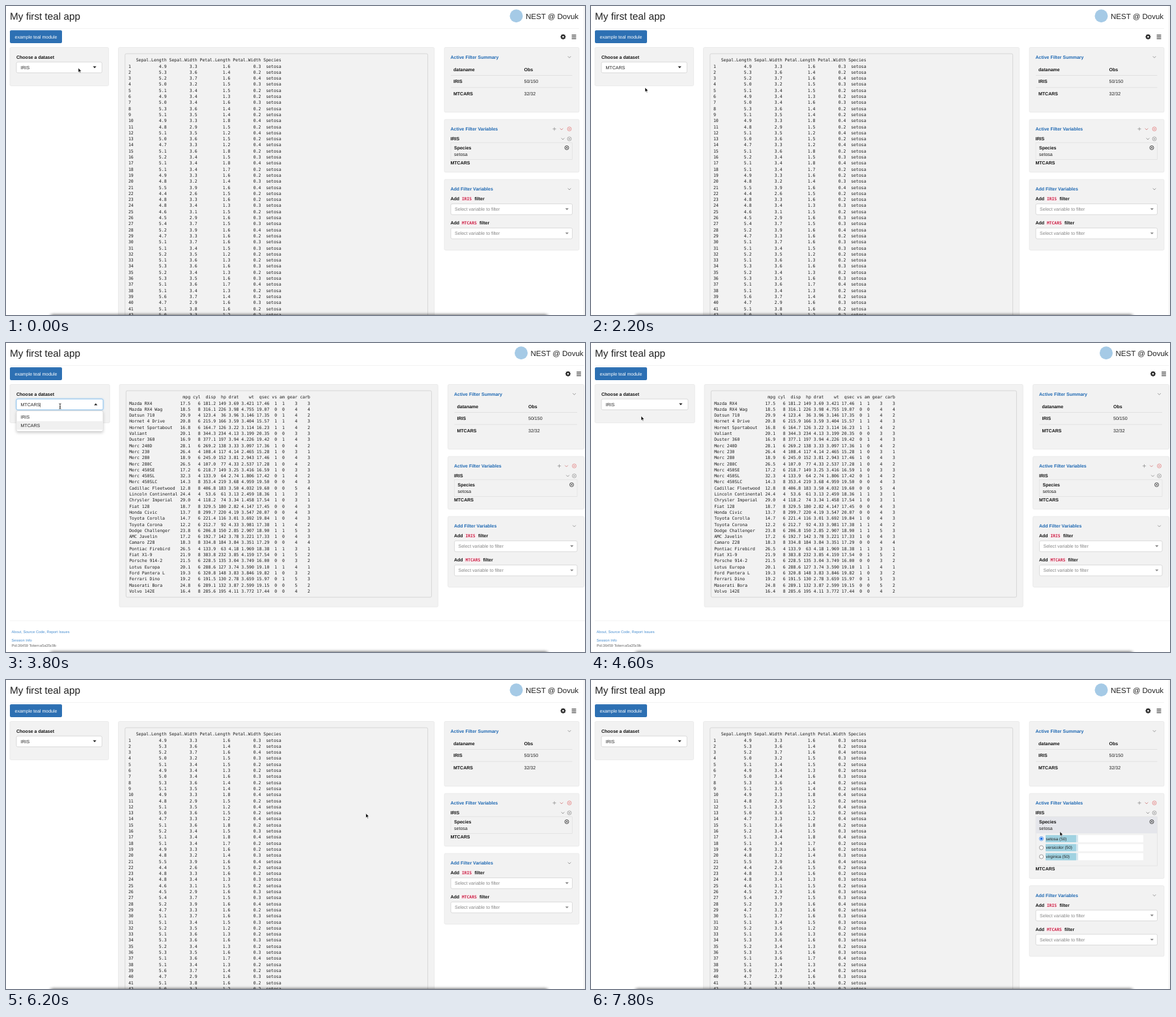
These frames come from a looping animation (889 by 474 pixels, 8 s). An HTML page:

```html
<!DOCTYPE html>
<html lang="en">
<head>
<meta charset="utf-8">
<title>My first teal app</title>
<style>
  html, body { margin: 0; width: 100%; height: 100%; overflow: hidden; background: #fff; }
  svg { display: block; width: 889px; height: 474px; }
  text { font: 7.05px "Liberation Sans", Arial, sans-serif; fill: #222; white-space: pre; text-rendering: geometricPrecision; }
  .bold { font-weight: bold; font-size: 7px; fill: #111; }
  .head { font-weight: bold; font-size: 7px; fill: #1f69b3; }
  .mono { font: 6.5px "DejaVu Sans Mono", monospace; fill: #1c1c1c; }
  .code { font: bold 6.3px "DejaVu Sans Mono", monospace; fill: #cb1f45; }
  .hint { fill: #858585; }
  .foot { font-size: 5.66px; fill: #666; }
  .link { font-size: 5.66px; fill: #4a8fd0; }
</style>
</head>
<body>
<svg id="stage" viewBox="0 0 889 474"></svg>
<script>
const LOOP = 8000, TICK = 200;
const PANEL = '#f2f2f2', EDGE = '#e3e3e3';

// Printed data frames, filled with seeded random values
let seed = 7;
const random = () => (seed = seed * 16807 % 2147483647) / 2147483647;
const near = (mean, spread) => mean + spread * (random() + random() + random() - 1.5);

function irisRow(i) {
  const size = near(0, 1);
  const values = [5 + .45 * size, 3.4 + .4 * size + near(0, .25), near(1.46, .3), .2 + .2 * random() ** 2];
  const widths = [12, 12, 13, 12];
  return String(i + 1).padEnd(2) + values.map((v, k) => v.toFixed(1).padStart(widths[k] + (k ? 0 : 1))).join('') + '  setosa';
}

function carRow(name) {
  const cyl = 4 + 2 * Math.floor(random() * 3), straight = cyl < 8 && random() < .8;
  const columns = [
    [near(38 - 2.8 * cyl, 7), 5, 1], [cyl, 4, 0], [near(60 * cyl - 130, 80), 6, 1], [near(32 * cyl - 50, 40), 4, 0],
    [near(3.6, .7), 5, 2], [near(.43 * cyl + .6, .8), 6, 3], [near(18, 2.4), 6, 2], [straight ? 1 : 0, 3, 0],
    [random() < .4 ? 1 : 0, 3, 0], [3 + 2 * random(), 5, 0], [cyl / 2 * (.4 + .6 * random()), 5, 0],
  ];
  return name.padEnd(19) + columns.map(([v, width, digits]) => v.toFixed(digits).padStart(width)).join('');
}

const carNames = 'Mazda RX4,Mazda RX4 Wag,Datsun 710,Hornet 4 Drive,Hornet Sportabout,Valiant,Duster 360,Merc 240D,'
  + 'Merc 230,Merc 280,Merc 280C,Merc 450SE,Merc 450SL,Merc 450SLC,Cadillac Fleetwood,Lincoln Continental,'
  + 'Chrysler Imperial,Fiat 128,Honda Civic,Toyota Corolla,Toyota Corona,Dodge Challenger,AMC Javelin,Camaro Z28,'
  + 'Pontiac Firebird,Fiat X1-9,Porsche 914-2,Lotus Europa,Ford Pantera L,Ferrari Dino,Maserati Bora,Volvo 142E';
const irisLines = ['   Sepal.Length Sepal.Width Petal.Length Petal.Width Species', ...Array.from({ length: 42 }, (_, i) => irisRow(i))];
const carLines = [' '.repeat(20) + ' mpg cyl  disp  hp drat    wt  qsec vs am gear carb', ...carNames.split(',').map(carRow)];

// Pointer moves: start, end, x, y
const pointerMoves = [
  [400, 800, 90.5, 94], [1300, 2000, 83, 125], [2600, 3300, 83, 97],
  [3800, 4300, 77, 112], [5400, 6600, 719, 237], [6600, 6800, 720, 232.5],
];
const clamp = p => Math.min(1, Math.max(0, p));
const smooth = p => p * p * (3 - 2 * p);

function pointerAt(t) {
  let x = 111, y = 95;
  for (const [start, end, toX, toY] of pointerMoves) {
    const p = smooth(clamp((t - start) / (end - start)));
    x += (toX - x) * p;
    y += (toY - y) * p;
  }
  return [x, y];
}

// The CSS "ease" curve
function ease(p) {
  if (p <= 0 || p >= 1) return clamp(p);
  const bezier = (s, a, b) => 3 * (1 - s) ** 2 * s * a + 3 * (1 - s) * s * s * b + s ** 3;
  let low = 0, high = 1;
  for (let i = 0; i < 20; i++) {
    const mid = (low + high) / 2;
    if (bezier(mid, .25, .25) < p) low = mid; else high = mid;
  }
  return bezier(low, .1, 1);
}

const text = (x, y, string, style = '', extra = '') => `<text x="${x}" y="${y}" class="${style}" ${extra}>${string}</text>`;
const box = (x0, y0, x1, y1, fill, stroke = 'none', r = 0, extra = '') =>
  `<rect x="${x0}" y="${y0}" width="${x1 - x0}" height="${y1 - y0}" rx="${r}" fill="${fill}" stroke="${stroke}" stroke-width=".6" ${extra}/>`;
const path = (x, y, d, stroke, width = .8, fill = 'none') =>
  `<path transform="translate(${x} ${y})" d="${d}" fill="${fill}" stroke="${stroke}" stroke-width="${width}"/>`;
const circle = (x, y, r, fill, stroke = 'none', width = .8) =>
  `<circle cx="${x}" cy="${y}" r="${r}" fill="${fill}" stroke="${stroke}" stroke-width="${width}"/>`;
const rule = (x0, x1, y, color) => box(x0, y - .3, x1, y + .3, color);
const chevron = (x, y, color = '#888') => path(x, y, 'M-2.3-1.2L0 1.2L2.3-1.2', color);
const closeIcon = (x, y, color) => circle(x, y, 3, 'none', color) + path(x, y, 'M-1.2-1.2L1.2 1.2M1.2-1.2L-1.2 1.2', color, .9);
const caret = (x, y, color, up) => path(x, y, up ? 'M-2.6 1.4H2.6L0-1.5Z' : 'M-2.6-1.4H2.6L0 1.5Z', 'none', 0, color);

const defs = `<defs>
  <filter id="soft" x="-10%" y="-300%" width="120%" height="700%"><feGaussianBlur stdDeviation="2.6"/></filter>
  <filter id="shadow" x="-10%" y="-30%" width="120%" height="170%"><feDropShadow dx="0" dy="2" stdDeviation="2" flood-opacity=".2"/></filter>
  <filter id="glow" x="-10%" y="-50%" width="120%" height="200%"><feDropShadow dx="0" dy="0" stdDeviation="1.4" flood-color="#66afe9" flood-opacity=".7"/></filter>
</defs>`;

function header(right) {
  const bars = [-2.7, 0, 2.7].map(dy => box(868.6 + right, 46.8 + dy, 875.4 + right, 47.9 + dy, '#222')).join('');
  const teeth = [0, 45, 90, 135].map(a => `<rect x="-.9" y="-4" width="1.8" height="8" transform="translate(${855.4 + right} 47.3) rotate(${a})" fill="#222"/>`).join('');
  return text(6, 20.8, 'My first teal app', '', 'style="font-size:15.3px"')
    + circle(783.5 + right, 15.3, 10, '#a5cae6')
    + text(798 + right, 19.8, 'NEST @ Dovuk', '', 'style="font-size:11.5px"')
    + rule(6, 880 + right, 34.3, '#ebebeb')
    + box(6, 37.2, 86, 57, '#2d70b3', 'none', 2)
    + text(46, 49.7, 'example teal module', '', 'text-anchor="middle" style="fill:#fff"')
    + teeth + circle(855.4 + right, 47.3, 2.2, '#fff', '#222', 1.6) + bars;
}

function datasetPicker(wide, value, open, hovered) {
  const right = wide ? 149 : 147.3;
  const cursor = open ? '<tspan dx="-.8">|</tspan>' : '';
  let out = box(6, 63.5, right + 10.3, 122.5, PANEL, EDGE, 2)
    + text(16, 80.5, 'Choose a dataset', 'bold')
    + box(16, 86, right, 102.5, '#fff', open ? '#66afe9' : '#c8c8c8', 2, open ? 'filter="url(#glow)"' : '')
    + text(22.5, 96.7, value + cursor)
    + caret(right - 11.2, 94, '#222', open);
  if (open) {
    const top = hovered === 'IRIS' ? 107 : 120;
    out += box(16, 104, right, 135.5, '#fff', '#ccc', 2, 'filter="url(#shadow)"')
      + box(16.3, top, right - .3, top + 13, '#f0f0f0')
      + text(22.5, 115.7, 'IRIS') + text(22.5, 128.8, 'MTCARS');
  }
  return out;
}

function printout(wide) {
  const frame = wide
    ? box(174, 63.5, 663.3, 405, PANEL, EDGE, 2) + box(184.3, 73.2, 653.4, 390, PANEL, '#c4c4c4', 2)
    : box(172.5, 63.5, 657.6, 500, PANEL, EDGE, 2) + box(182.8, 73.2, 647.6, 500, PANEL, '#c4c4c4', 2);
  return frame + (wide ? carLines : irisLines)
    .map((line, i) => text(wide ? 189.2 : 187.9, 85.2 + 9.3 * i, line, 'mono')).join('');
}

function summary(left, right) {
  const obs = 795.5 + (left + right) / 2, name = 687 + left;
  return box(673 + left, 63.5, 880 + right, 163, PANEL, EDGE, 2)
    + text(682.5 + left, 80.6, 'Active Filter Summary', 'head') + chevron(865 + right, 78.3)
    + text(name, 99.7, 'dataname', 'bold') + text(obs, 99.7, 'Obs', 'bold')
    + text(name, 118.1, 'IRIS', 'bold') + text(obs, 118.1, '50/150')
    + text(name, 136.6, 'MTCARS', 'bold') + text(obs, 136.6, '32/32')
    + rule(683 + left, 869.5 + right, 106.5, '#d8d8d8') + rule(683 + left, 869.5 + right, 125, '#d8d8d8');
}

function activeFilters(left, right, grow, hover, bar) {
  const x = 682.5 + left, x1 = 869.5 + right;
  const choices = ['setosa', 'versicolor', 'virginica'].map((name, i) => {
    const y = 243.4 + 13.8 * i;
    return box(698, y - 5.5, 848, y + 5.5, '#fff') + box(698, y - 5.5, 748, y + 5.5, '#d6e7ef')
      + box(698, y - 5.5, 698 + 50 * bar, y + 5.5, '#a0d2e1')
      + circle(691.5, y, 3.1, '#fff', i ? '#777' : '#1a73e8', .7) + (i ? '' : circle(691.5, y, 1.9, '#1a73e8'))
      + text(698.6, y + 2.2, `${name} (50)`, '', 'style="font-size:6.35px"');
  }).join('');
  return box(673 + left, 174, 880 + right, 255 + grow, PANEL, EDGE, 2)
    + text(x, 191, 'Active Filter Variables', 'head')
    + path(842 + right, 188.6, 'M-2.6 0H2.6M0-2.6V2.6', '#888', .7)
    + chevron(853 + right, 188.8, '#d07a7a') + closeIcon(865 + right, 188.6, '#e58080')
    + text(x, 206, 'IRIS', 'bold') + chevron(855 + right, 203.8) + closeIcon(865 + right, 203.8, '#999')
    + box(x + .5, 209.8, x1, 235.5 + grow, PANEL, '#dcdcdc')
    + (hover ? box(x + .8, 210, x1 - .3, 235.3, '#e5e6eb') : '')
    + text(688 + left, 220, 'Species', 'bold') + text(688 + left, 230.2, 'setosa')
    + closeIcon(861 + right, 217.4, '#222')
    + (grow ? `<clipPath id="body"><rect x="683" y="235.5" width="187" height="${grow}"/></clipPath><g clip-path="url(#body)">${choices}</g>` : '')
    + text(x, 242.9 + grow, 'MTCARS', 'bold');
}

function addFilters(left, right, grow) {
  const x = 682.5 + left;
  const field = (name, y, end) => text(x, y, 'Add', 'bold')
    + box(x + 15.2, y - 6.5, x + end - 2, y + 2, '#f8f0f2', 'none', 1)
    + text(x + 17.5, y, name, 'code') + text(x + end, y, 'filter', 'bold')
    + box(x + .5, y + 5.3, 869.5 + right, y + 21.8, '#fff', '#c8c8c8', 2)
    + text(x + 6.5, y + 16.1, 'Select variable to filter', 'hint')
    + caret(861.3 + right, y + 13.5, '#888');
  return `<g transform="translate(0 ${grow})">`
    + box(673 + left, 266, 880 + right, 374.5, PANEL, EDGE, 2)
    + text(x, 283.2, 'Add Filter Variables', 'head') + chevron(865 + right, 280.8)
    + field('IRIS', 298.2, 37) + field('MTCARS', 335.3, 44.5) + '</g>';
}

const footer = rule(6, 889, 426, '#ebebeb')
  + text(8.5, 444.8, 'About, Source Code, Report Issues', 'link')
  + text(8.5, 457.7, 'Session Info', 'link')
  + text(8.5, 465.7, 'Pid:36459 Token:a5a35c9b', 'foot');

const arrow = 'M0 0V6.9L1.6 5.4L2.6 7.8L3.7 7.3L2.7 5H4.8Z';
const beam = 'M-1.6-4Q0-4 0-3Q0-4 1.6-4M0-3V3M-1.6 4Q0 4 0 3Q0 4 1.6 4M-1 1H1';

function scene(t) {
  const wide = t >= 2400 && t < 4800;
  const open = t >= 1200 && t < 2200 || t >= 3400 && t < 4600;
  const value = t >= 2200 && t < 4600 ? 'MTCARS' : 'IRIS';
  const [x, y] = pointerAt(t);
  const hovered = y < 106 ? value : y < 120 ? 'IRIS' : 'MTCARS';
  const left = wide ? 5.5 : 0, right = wide ? 7.5 : 0;
  const grow = 49.5 * ease((t - 7150) / 350);
  const bar = ease((t - 7385) / 600);
  return defs + header(right) + printout(wide) + summary(left, right)
    + activeFilters(left, right, grow, t >= 6800, bar) + addFilters(left, right, grow)
    + datasetPicker(wide, value, open, hovered)
    + (wide ? footer : box(887.3, 0, 890, 474, '#fafafa', '#e8e8e8'))
    + box(68, 474, 832, 484, '#000', 'none', 4, 'opacity=".8" filter="url(#soft)"')
    + (open && y < 103 ? path(x, y, beam, '#111', .8) : path(x, y, arrow, '#fff', .6, '#000'));
}

const stage = document.getElementById('stage');
const start = performance.now();
let shown = -1;
function play() {
  const t = Math.floor((performance.now() - start) % LOOP / TICK) * TICK;
  if (t !== shown) stage.innerHTML = scene(shown = t);
  requestAnimationFrame(play);
}
play();
</script>
</body>
</html>
```
